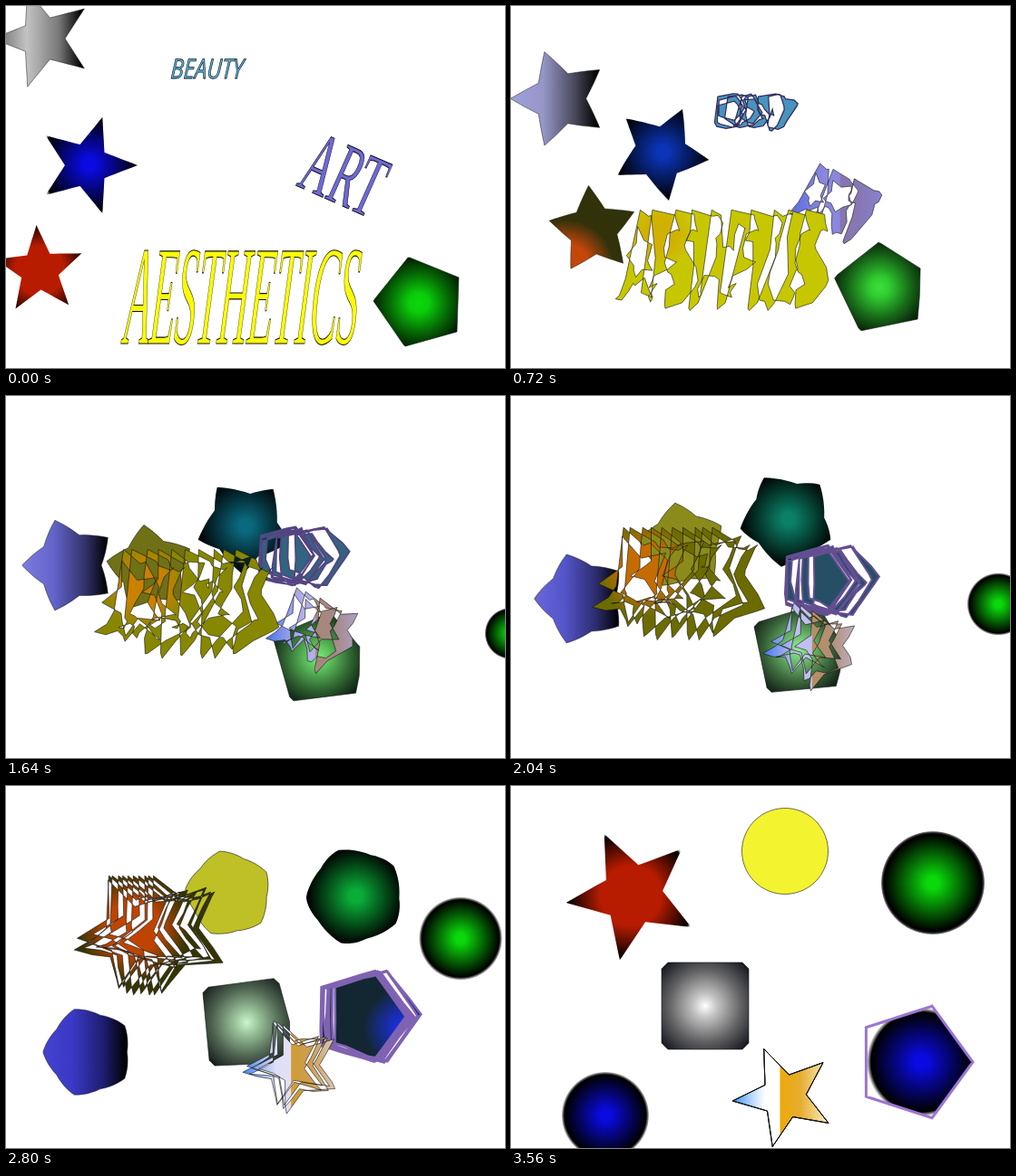
Animation, 550 px wide and 400 px high, one loop 3600 ms. Source, as an HTML page:

```html
<!DOCTYPE html>
<html lang="en">
<head>
<meta charset="utf-8">
<title>Beauty, Art, Aesthetics</title>
<style>
  html, body { margin: 0; width: 100%; height: 100%; overflow: hidden; background: #fff; }
  svg { display: block; width: 550px; height: 400px; }
  text { stroke: #111; vector-effect: non-scaling-stroke; }
</style>
</head>
<body>
<svg id="stage" viewBox="0 0 550 400">
  <defs id="defs"></defs>
  <g id="shapes"></g>
  <g id="words">
    <text transform="matrix(.8 0 -.06 1 181 80)" font-family="'Open Sans', sans-serif" font-style="italic" font-size="30" fill="#5ab9ee" stroke-width=".7">BEAUTY</text>
    <text transform="matrix(.43 .191 -.407 .914 319 198)" font-family="'Liberation Serif', serif" font-size="98" fill="#6e69d6" stroke-width=".8">ART</text>
    <text transform="matrix(.29 0 -.08 1 129 373)" font-family="'Liberation Serif', serif" font-style="italic" font-size="156" fill="#fafa0a" stroke-width=".8">AESTHETICS</text>
  </g>
</svg>
<script>
const LOOP = 3600, STEP = 40, LAST = LOOP / STEP - 1;
const NS = 'http://www.w3.org/2000/svg';
const byId = id => document.getElementById(id);

const BLACK = [0, 0, 0], WHITE = [255, 255, 255];
const BLUE = [10, 10, 225], GREEN = [10, 216, 10], RED = [184, 28, 0];
const YELLOW = [243, 243, 48], SKY = [90, 185, 238], VIOLET = [110, 105, 214];
const DUSK = [25, 25, 60], PURPLE = [156, 118, 210];

const mix = (a, b, t) => a + (b - a) * t;
const blend = (a, b, t) => a.map((v, i) => mix(v, b[i], t));
const rgb = c => `rgb(${c.map(Math.round)})`;

function make(tag, parent, attrs = {}) {
  const el = parent.appendChild(document.createElementNS(NS, tag));
  return set(el, attrs);
}
function set(el, attrs) {
  for (const k in attrs) el.setAttribute(k, attrs[k]);
  return el;
}

// Colour at time t from rows of [time, r, g, b]
function ramp(rows, t) {
  let i = 1;
  while (i < rows.length - 1 && rows[i][0] < t) i++;
  const a = rows[i - 1], b = rows[i];
  return blend(a, b, (t - a[0]) / (b[0] - a[0])).slice(1);
}

// Outlines
function ring(cx, cy, radii, n, deg) {
  return Array.from({ length: n }, (_, i) => {
    const a = (deg + i * 360 / n) * Math.PI / 180, r = radii[i % radii.length];
    return [cx + r * Math.cos(a), cy + r * Math.sin(a)];
  });
}
const star = (cx, cy, r, deg, inner = .43) => ring(cx, cy, [r, r * inner], 10, deg);
const circle = (cx, cy, r, deg = 0) => ring(cx, cy, [r], 60, deg);

// Letter contours on a 0-9 grid, holes after the slash
const GLYPHS = {
  A: '40 50 99 79 66 36 29 09/42 55 35',
  B: '00 60 92 84 96 69 09/22 62 63 23/25 65 67 27',
  C: '30 90 92 42 24 25 47 97 99 39 06 03',
  E: '00 90 92 22 24 74 75 25 27 97 99 09',
  H: '00 20 24 74 70 90 99 79 76 26 29 09',
  I: '30 60 69 39',
  R: '00 60 92 94 65 99 79 45 25 29 09/22 62 64 24',
  S: '20 90 92 32 23 85 97 79 09 07 67 76 15 02',
  T: '00 90 92 62 59 39 42 02',
  U: '00 20 26 48 58 76 70 90 97 69 39 07',
  Y: '00 20 43 70 90 55 49 29 35'
};
function spell(word, width, height, [a, b, c, d, e, f]) {
  const weight = ch => ch === 'I' ? .6 : 1;
  const unit = width / [...word].reduce((s, ch) => s + weight(ch), 0);
  const out = [];
  let left = 0;
  for (const ch of word) {
    const w = unit * weight(ch);
    for (const part of GLYPHS[ch].split('/')) {
      out.push(part.split(' ').map(p => {
        const x = left + p[0] / 9 * w * .86, y = (p[1] / 9 - 1) * height;
        return [a * x + c * y + e, b * x + d * y + f];
      }));
    }
    left += w;
  }
  return out;
}

// Pairs matching points of two outlines, keeping every corner of both
function pointAt(poly, u) {
  const n = poly.length, x = u * n, i = Math.floor(x);
  return blend(poly[i % n], poly[(i + 1) % n], x - i);
}
function pair(from, to) {
  const n = from.length, m = to.length, marks = new Set();
  for (let i = 0; i < n; i++) marks.add(i * m);
  for (let j = 0; j < m; j++) marks.add(j * n);
  return [...marks].sort((p, q) => p - q)
    .map(k => [pointAt(from, k / (n * m)), pointAt(to, k / (n * m))]);
}
const trace = (pairs, t) => 'M' + pairs.map(([p, q]) =>
  blend(p, q, t).map(v => v.toFixed(1)).join(' ')).join('L') + 'Z';

// Gradients: stops are [offset, colour, opacity]
function gradient(id, type) {
  return make(type + 'Gradient', byId('defs'), { id, gradientUnits: 'userSpaceOnUse' });
}
function stops(grad, list) {
  list.forEach(([offset, color, alpha = 1], i) => {
    const el = grad.children[i] || make('stop', grad);
    set(el, { offset, 'stop-color': rgb(color), 'stop-opacity': alpha });
  });
}
function glow(grad, cx, cy, r, list) {
  set(grad, { cx, cy, r: Math.max(r, .1) });
  stops(grad, list);
}
const faded = (core, edge = BLACK) => [[0, core], [.12, core], [.92, edge], [1, edge, 0]];

const layers = [];
function layer(name, type, from, to, paint, line = {}) {
  const grad = gradient(name, type);
  const path = make('path', byId('shapes'), {
    fill: `url(#${name})`, 'fill-rule': 'evenodd', 'stroke-linejoin': 'miter', ...line
  });
  const parts = from.map(p => pair(p, to));
  layers.push(t => {
    set(path, { d: parts.map(p => trace(p, t)).join('') });
    paint(grad, t, path);
  });
}
const hair = { stroke: '#111', 'stroke-width': .6 };

// Silver star to blue ball
const lastGlow = gradient('ball', 'radial');
glow(lastGlow, 104, 364, 49, faded(BLUE));
const silver = [
  [0, [[0, 100, 100, 100], [.2, 160, 160, 220], [.46, 125, 125, 222], [1, 30, 30, 200]]],
  [.35, [[0, 195, 195, 195], [.2, 150, 150, 200], [.46, 100, 100, 204], [1, 30, 30, 195]]],
  [.7, [[0, 120, 120, 120], [.2, 70, 70, 88], [.46, 50, 50, 105], [1, 15, 15, 115]]]
];
layer('silver', 'linear', [star(41, 36, 56, 180)], circle(104, 364, 48, 180), (g, t, path) => {
  const cx = mix(41, 104, t);
  set(g, { x1: cx - 54, x2: cx + 48, y1: 0, y2: 0 });
  stops(g, [...silver.map(([o, rows]) => [o, ramp(rows, t)]), [.94, BLACK]]);
  set(path, { fill: t === 1 ? 'url(#ball)' : 'url(#silver)', 'stroke-opacity': t === 1 ? 0 : .8 });
}, hair);

// Blue star to green ball
layer('blue', 'radial', [star(89, 176, 56, 0)], circle(465, 107, 57, 43), (g, t) =>
  glow(g, mix(92, 465, t), mix(175, 107, t), 58, faded(blend(BLUE, GREEN, t))));

// Red star to yellow disc
layer('red', 'radial', [star(37, 292, 50, -94)], circle(302, 72, 47.5, -104), (g, t, path) => {
  const core = blend(RED, YELLOW, t), edge = blend(BLACK, YELLOW, t);
  glow(g, mix(37, 302, t) - 150 * t, mix(292, 72, t) + 210 * t, 54, [[0, core], [.5, core], [1, edge]]);
  set(path, { 'stroke-opacity': Math.min(1, t * 4) });
}, hair);

// Green pentagon to grey rounded square
const pentagon = [[405, 326], [407, 323], [443, 278], [445, 278], [499, 300],
  [498, 330], [497, 360], [440, 376], [438, 374]];
const square = [[166, 202], [173, 195], [255, 195], [262, 202], [262, 250],
  [262, 284], [255, 291], [173, 291], [166, 284]];
layer('green', 'radial', [pentagon], square, (g, t) => {
  glow(g, mix(455, 214, t), mix(328, 243, t), mix(54, 66, t), [
    [0, blend(GREEN, WHITE, t)],
    [.2, blend([10, 205, 10], [195, 195, 195], t)],
    [.6, blend([5, 105, 5], [98, 98, 100], t)],
    [1, blend([0, 16, 0], [14, 16, 24], t)]
  ]);
}, hair);

// Growing green ball
layer('grow', 'radial', [circle(634, 395, 4)], circle(465, 107, 57), (g, t) =>
  glow(g, mix(634, 465, t), mix(395, 107, t), mix(4, 58, t), faded(GREEN)));

// Words to framed pentagon, gilt star and red star
layer('beauty', 'radial', spell('BEAUTY', 84, 22, [1, 0, -.2, 1, 182, 80]),
  ring(444, 305, [65], 5, -144), (g, t, path) => {
    const edge = blend(SKY, BLACK, t);
    glow(g, mix(225, 452, t) + 160 * (1 - t), mix(69, 305, t) + 60 * (1 - t), 60 * t, [
      [0, blend(SKY, BLUE, t)], [.12, blend(SKY, BLUE, t)], [.92, edge], [1, edge, t === 1 ? 0 : 1]
    ]);
    set(path, { stroke: rgb(blend(DUSK, PURPLE, t)), 'stroke-width': mix(.8, 3, t) });
  });

const gilt = [[0, [50, 145, 255]], [.2, [185, 215, 255]], [.34, WHITE], [.49, WHITE],
  [.5, [236, 170, 10]], [.7, [230, 172, 45]], [1, [250, 238, 200]]];
layer('art', 'linear', spell('ART', 96, 64, [.914, .407, -.407, .914, 319, 198]),
  star(301, 343, 57, -113), (g, t) => {
    set(g, { x1: mix(330, 244, t), x2: mix(430, 350, t), y1: 0, y2: 0 });
    stops(g, gilt.map(([o, c]) => [o, blend(VIOLET, c, t)]));
  }, hair);

layer('aesthetics', 'radial', spell('AESTHETICS', 262, 104, [1, 0, -.155, 1, 126, 373]),
  star(134, 120, 74, -115, .45), (g, t, path) => {
    const core = blend([215, 215, 0], RED, t), edge = blend([250, 250, 0], BLACK, t);
    glow(g, mix(172, 132, t), mix(286, 121, t), mix(30, 74, t), [
      [0, core], [.45, core], [.95, edge], [1, edge, t === 1 ? 0 : 1]
    ]);
    set(path, { 'stroke-opacity': t === 1 ? 0 : 1 });
  }, hair);

const wordPaths = [...byId('shapes').children].slice(-3);
const start = performance.now();
let shown = -1;
function draw() {
  const step = Math.floor((performance.now() - start) % LOOP / STEP);
  if (step !== shown) {
    shown = step;
    layers.forEach(update => update(step / LAST));
    // Plain type while the words still stand still
    byId('words').style.display = step ? 'none' : '';
    wordPaths.forEach(p => p.style.display = step ? '' : 'none');
  }
  requestAnimationFrame(draw);
}
draw();
</script>
</body>
</html>
```
